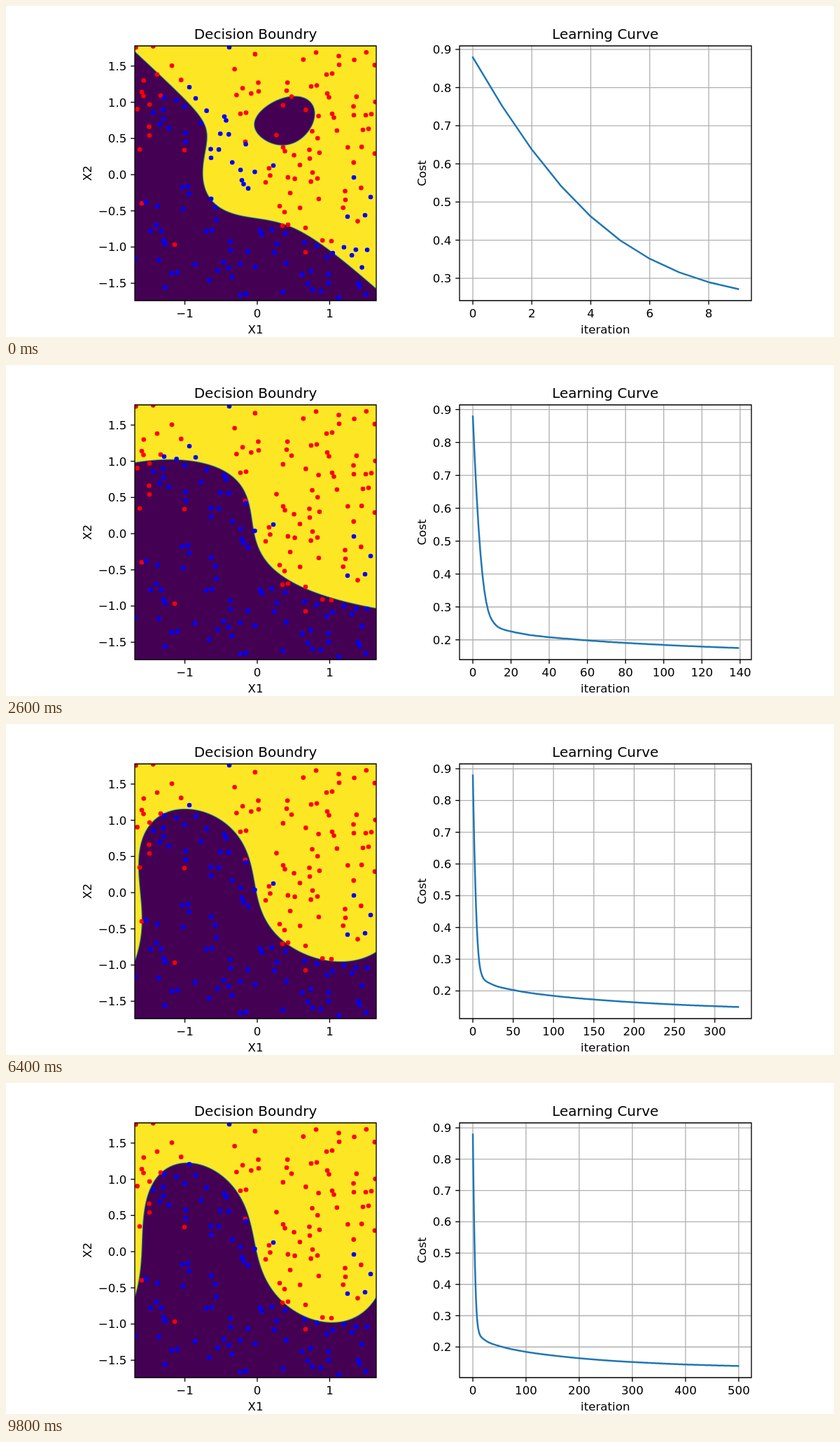
An HTML page with a canvas that plays this animation: 1183x473 px, repeating every 10000 ms.

```html
<!DOCTYPE html>
<html lang="en">
<head>
<meta charset="utf-8">
<title>Decision Boundry</title>
<style>
html, body { margin: 0; width: 100%; height: 100%; overflow: hidden; background: #fff; }
canvas, svg { position: absolute; left: 0; top: 0; }
canvas { left: 184px; top: 57px; }
text { font: 16.67px "DejaVu Sans", sans-serif; text-anchor: middle; }
.title { font-size: 20px; }
.end { text-anchor: end; }
.line { stroke: #000; stroke-width: 1.33; fill: none; }
.grid { stroke: #b0b0b0; stroke-width: 1.33; }
.cost { stroke: #1f77b4; stroke-width: 2.5; fill: none; stroke-linejoin: round; stroke-linecap: square; }
</style>
</head>
<body>
<canvas id="region" width="345" height="364"></canvas>
<svg width="1183" height="473">
  <clipPath id="clip"><rect x="184" y="57" width="345" height="364"/></clipPath>
  <g id="dots" clip-path="url(#clip)"></g>
  <g id="plot"></g>
  <g id="frame"></g>
</svg>
<script>
const $ = id => document.getElementById(id);
const W = 345, H = 364, LEFT = 184, TOP = 57, BOTTOM = 421;
const UNIT = 103.45, X0 = 359, Y0 = 241;
const STEP = 200, STEPS = 50;
const toData = (px, py) => [(px - X0) / UNIT, (Y0 - py) / UNIT];
const pairs = flat => flat.flatMap((v, i) => i % 2 ? [] : [[v, flat[i + 1]]]);
const lerp = (a, b, t) => a + (b - a) * t;
const clamp = v => Math.max(0, Math.min(1, v));

// --- boundary: zero set of a cubic, fitted to a few points at chosen iterations
const basis = (x, y) => [1, x, y, x*x, x*y, y*y, x*x*x, x*x*y, x*y*y, y*y*y];
const dot = (a, b) => a.reduce((s, v, i) => s + v * b[i], 0);
const YELLOW = pairs([1.5,.5, 1,1.7, -1,1.65, 1.4,-.3]);
const DARK = pairs([-1,-1, 0,-1.4, 1,-1.6, -1.2,.5]);

const KEYS = [
  [10, [184,66, 235,112, 284,170, 281,238, 315,293, 395,311, 480,363, 529,404,
        355,168, 408,129, 441,152, 398,199]],
  [90, [184,128, 290,158, 337,197, 348,243, 374,281, 410,304, 529,356]],
  [190, [184,157, 200,140, 245,129.5, 312,147, 348,192, 358,243, 410,315, 470,336, 529,340.5]],
  [500, [184,306, 196,200, 228,123, 260,114, 300,127, 348,195, 358,240, 405,321, 466,342, 529,306]]
].map(([n, flat]) => [Math.log(n), fit(pairs(flat).map(p => toData(...p)))]);

function solve(m) {
  const n = m.length;
  for (let c = 0; c < n; c++) {
    let best = c;
    for (let r = c; r < n; r++) if (Math.abs(m[r][c]) > Math.abs(m[best][c])) best = r;
    [m[c], m[best]] = [m[best], m[c]];
    for (let r = 0; r < n; r++) {
      if (r === c) continue;
      const f = m[r][c] / m[c][c];
      for (let k = c; k <= n; k++) m[r][k] -= f * m[c][k];
    }
  }
  return m.map((row, i) => row[n] / row[i]);
}

// least squares, reweighted by the slope so that errors count as distances
function fit(edge) {
  let w = null;
  const slope = (x, y) => {
    const e = 1e-3, p = (a, b) => dot(w, basis(a, b));
    return Math.hypot(p(x + e, y) - p(x - e, y), p(x, y + e) - p(x, y - e)) / (2 * e);
  };
  for (let pass = 0; pass < 6; pass++) {
    const m = Array.from({ length: 10 }, () => Array(11).fill(0));
    const add = ([x, y], target, weight) => {
      const b = basis(x, y);
      for (let i = 0; i < 10; i++) {
        for (let j = 0; j < 10; j++) m[i][j] += weight * b[i] * b[j];
        m[i][10] += weight * b[i] * target;
      }
    };
    edge.forEach(p => add(p, 0, w ? (slope(...p) + .05) ** -2 : 1));
    YELLOW.forEach(p => add(p, 1, 5e-4));
    DARK.forEach(p => add(p, -1, 5e-4));
    for (let i = 0; i < 10; i++) m[i][i] += 1e-7;
    w = solve(m);
  }
  return w;
}

function weights(n) {
  const u = Math.log(n);
  let i = 0;
  while (i < KEYS.length - 2 && KEYS[i + 1][0] < u) i++;
  const [[u0, a], [u1, b]] = [KEYS[i], KEYS[i + 1]];
  return a.map((v, k) => lerp(v, b[k], (u - u0) / (u1 - u0)));
}

const ctx = $("region").getContext("2d");
const image = ctx.createImageData(W, H);
const SHADES = [[68, 1, 84], [33, 145, 140], [253, 231, 37]];

function drawRegion(w) {
  let o = 0;
  for (let row = 0; row < H; row++) {
    const y = (Y0 - TOP - row - .5) / UNIT;
    const a = w[0] + y * (w[2] + y * (w[5] + y * w[9]));
    const b = w[1] + y * (w[4] + y * w[8]), c = w[3] + y * w[7], d = w[6];
    const ay = w[2] + y * (2 * w[5] + 3 * y * w[9]), by = w[4] + 2 * y * w[8];
    for (let col = 0; col < W; col++) {
      const x = (LEFT + col + .5 - X0) / UNIT;
      const p = ((d * x + c) * x + b) * x + a;
      const grad = Math.hypot((3 * d * x + 2 * c) * x + b, (w[7] * x + by) * x + ay);
      const t = 2 * clamp(.5 + p * UNIT / (grad + 1e-9) / 2);
      const s = t < 1 ? 0 : 1;
      for (let k = 0; k < 3; k++) image.data[o++] = lerp(SHADES[s][k], SHADES[s + 1][k], t - s);
      image.data[o++] = 255;
    }
  }
  ctx.putImageData(image, 0, 0);
}

// --- scatter: leading points have a close neighbour, the rest is seeded noise on the class's side
const NEIGHBOUR = [[2.5, 5.5], [8, -1.5], [7, 8.5], [-.5, -12.5]];
const RED = [
  194,123, 396,202, 466,154, 459,125,
  436,115, 514,156, 510,177, 395,314, 335,154, 458,98,
  401,121, 391,286, 438,238,
  361,122, 476,84, 497,156, 434,218, 485,277, 205,185,
  241,341, 255,206, 428,352, 194,282, 191,205, 221,128, 428,317, 465,336, 342,194, 371,252, 216,98];
const BLUE = [
  312,158, 337,249, 225,335, 363,321, 503,396,
  286,322, 237,382, 335,413, 252,259,
  431,397, 311,366, 215,313,
  225,161, 257,194, 293,217, 321,349, 461,396,
  319,59, 262,116, 271,132, 382,228, 521,273, 513,299, 488,301, 497,245];

let seed = 7;
const random = () => (seed = seed * 16807 % 2147483647) / 2147483647;

function scatter(flat, counts, total, side, color) {
  const points = pairs(flat), all = [...points];
  let i = 0;
  counts.forEach((n, kind) => {
    for (const end = i + n; i < end; i++)
      all.push([points[i][0] + NEIGHBOUR[kind][0], points[i][1] + NEIGHBOUR[kind][1]]);
  });
  const final = KEYS[KEYS.length - 1][1];
  for (let tries = 0; all.length < total && tries < 5000; tries++) {
    const x = LEFT + random() * W, y = TOP + random() * H;
    const inside = side * dot(final, basis(...toData(x, y))) > 0;
    if (inside && all.every(p => Math.hypot(p[0] - x, p[1] - y) > 9)) all.push([x, y]);
  }
  return all.map(([x, y]) => `<circle cx="${x}" cy="${y}" r="3.3" fill="${color}"/>`).join("");
}
$("dots").innerHTML = scatter(RED, [4, 6, 3, 6], 95, 1, "#f00") + scatter(BLUE, [5, 4, 3, 5], 96, -1, "#00f");

// --- axes
const text = (x, y, s, cls = "") => `<text x="${x}" y="${y}" class="${cls}">${s}</text>`;
const upright = (x, s) => `<text transform="translate(${x} 239) rotate(-90)">${s}</text>`;
const path = (d, cls) => `<path d="${d}" class="${cls}"/>`;
const xTick = (x, s) => path(`M${x} ${BOTTOM}v5.8`, "line") + text(x, 445, s);
const yTick = (left, y, s) => path(`M${left} ${y}h-5.8`, "line") + text(left - 11.7, y + 6, s, "end");
const box = (x, w) => path(`M${x} ${TOP}h${w}v${H}h${-w}z`, "line");
const signed = s => String(s).replace("-", "\u2212");

let axes = box(LEFT, W) + box(648, 417);
for (let v = -1; v <= 1; v++) axes += xTick(X0 + v * UNIT, signed(v));
for (let v = -1.5; v <= 1.5; v += .5) axes += yTick(LEFT, Y0 - v * UNIT, signed(v.toFixed(1)));
$("frame").innerHTML = axes +
  text(356.5, 47, "Decision Boundry", "title") + text(856.3, 47, "Learning Curve", "title") +
  text(356.5, 468.3, "X1") + text(856.3, 468.3, "iteration") +
  upright(121.5, "X2") + upright(599.5, "Cost");

// --- learning curve: a steep start on top of a slow tail
const TAIL = pairs([0,.24, 11,.2395, 20,.2255, 30,.2145, 50,.203, 90,.1875, 150,.173,
  269,.155, 400,.144, 499,.1393]);

function cost(i) {
  let k = 0;
  while (k < TAIL.length - 2 && TAIL[k + 1][0] < i) k++;
  const [[i0, c0], [i1, c1]] = [TAIL[k], TAIL[k + 1]];
  const u = v => Math.log(v + 1);
  return lerp(c0, c1, (u(i) - u(i0)) / (u(i1) - u(i0))) + .639 * Math.exp(-.21 * i - .0135 * i * i);
}

function tickStep(span) {
  const raw = span / 8, power = 10 ** Math.floor(Math.log10(raw));
  return power * [1, 2, 2.5, 5, 10].find(s => s * power >= raw);
}

function drawCurve(last) {
  const low = cost(last), high = cost(0), pad = (high - low) * .05;
  const X = i => 667 + i / last * 379.1;
  const Y = c => 73.5 + (high - c) / (high - low) * 330.9;
  let grid = "", ticks = "", d = "";
  for (let v = 0, step = tickStep(last * 1.1); v <= last * 1.05; v += step) {
    grid += path(`M${X(v)} ${TOP}v${H}`, "grid");
    ticks += xTick(X(v), v);
  }
  for (let k = Math.ceil((low - pad) * 10); k <= 9; k++) {
    const y = Y(k / 10);
    grid += path(`M648 ${y}h417`, "grid");
    ticks += yTick(648, y, (k / 10).toFixed(1));
  }
  for (let i = 0; i <= last; i++) d += `${i ? "L" : "M"}${X(i).toFixed(2)} ${Y(cost(i)).toFixed(2)}`;
  $("plot").innerHTML = grid + ticks + path(d, "cost");
}

// --- loop
const start = performance.now();
let shown = -1;
function tick() {
  const k = Math.floor((performance.now() - start) / STEP) % STEPS;
  if (k !== shown) {
    shown = k;
    const n = 10 * (k + 1);
    drawRegion(weights(n));
    drawCurve(n - 1);
  }
  requestAnimationFrame(tick);
}
tick();
</script>
</body>
</html>
```
